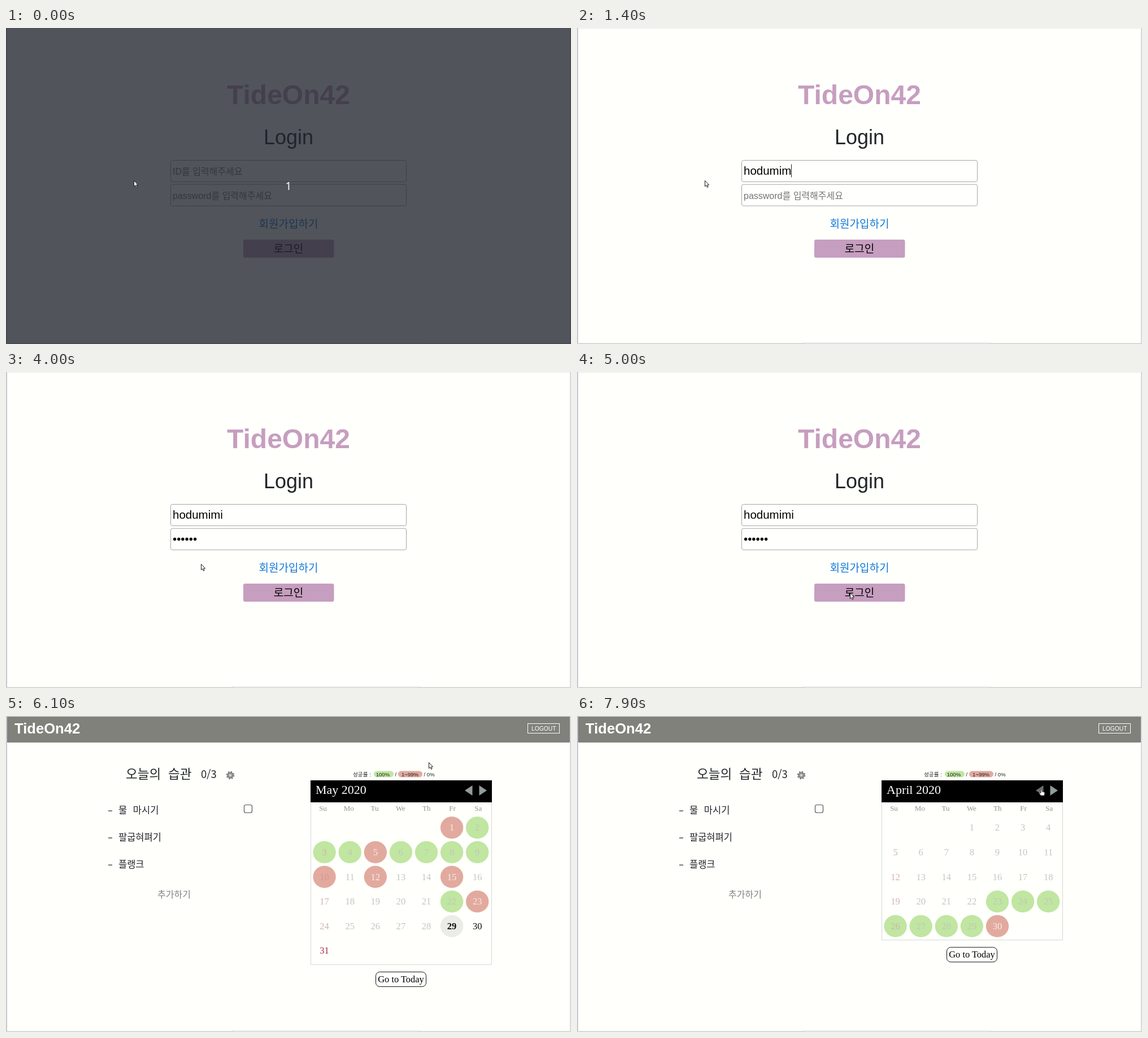
An HTML page for the animation above (8 s loop, 1000 by 560 pixels).

```html
<!DOCTYPE html>
<html lang="ko">
<head>
<meta charset="utf-8">
<title>Habit tracker</title>
<style>
html, body { margin: 0; width: 100%; height: 100%; overflow: hidden; background: #fffffc; }
svg { display: block; width: 1000px; height: 560px; }
text { white-space: pre; }
.sans { font-family: "Liberation Sans", "Noto Sans CJK KR", "Noto Sans CJK", sans-serif; }
.serif { font-family: "Liberation Serif", serif; }
.hand { font-family: "Noto Sans CJK KR", "Noto Sans CJK", sans-serif; font-weight: 300; }
.ui { font-family: "Noto Sans", sans-serif; }
</style>
</head>
<body>
<svg id="stage" viewBox="0 0 1000 560"></svg>
<script>
const LOOP = 8000, TICK = 100;
const BRAND = "TideOn42", USER = "hodumimi";
const INK = "#212529", GREEN = "#c0e6a1", RED = "#e2aa9e", LILAC = "#c69ebf", PAGE = "#fffffc";
const ID_KEYS = [400, 500, 700, 900, 1000, 1200, 1400, 1600];
const PW_KEYS = [2600, 2700, 2900, 3000, 3200, 3300];
// time, x, y of the pointer tip
const PATH = [
  [3800, 226, 270], [3900, 262, 292], [4000, 345, 340], [4100, 420, 370], [4200, 445, 377],
  [4400, 445, 377], [4500, 468, 385], [4600, 483, 391],
  [5600, 483, 391], [5700, 505, 362], [5800, 575, 255], [5900, 655, 140], [6000, 715, 66],
  [6100, 748, 82], [6200, 762, 105],
  [6400, 762, 105], [6500, 780, 113], [6600, 800, 122], [6700, 814, 127], [6800, 815, 113],
  [6900, 815, 113], [7000, 818, 127], [7100, 822, 130]
];

const stage = document.getElementById("stage");

function add(parent, tag, attrs, content) {
  const el = document.createElementNS("http://www.w3.org/2000/svg", tag);
  for (const key in attrs) el.setAttribute(key, attrs[key]);
  if (content !== undefined) el.textContent = content;
  parent.appendChild(el);
  return el;
}
const group = parent => add(parent, "g", {});
const rect = (parent, x, y, width, height, fill, more) =>
  add(parent, "rect", { x, y, width, height, fill, ...more });
const text = (parent, x, y, size, content, fill, cls = "sans", more) =>
  add(parent, "text", { x, y, "font-size": size, fill, class: cls, ...more }, content);
const mid = { "text-anchor": "middle" };
const show = (el, on) => el.setAttribute("display", on ? "inline" : "none");

rect(stage, 0, 0, 1000, 560, PAGE);

// Login page
const login = group(stage);
text(login, 500, 135, 48, BRAND, LILAC, "sans", { ...mid, "font-weight": 700 });
text(login, 500, 206, 36, "Login", INK, "sans", mid);

function field(y, hint) {
  rect(login, 291.5, y, 417, 38, "#fffffe", { rx: 3, stroke: "#a5a5a5" });
  return {
    hint: text(login, 295, y + 25.5, 16, hint, "#757575"),
    value: text(login, 295, y + 25.8, 20.5, "", "#000"),
    caret: rect(login, 295, y + 7, 1, 23, "#222")
  };
}
const idField = field(234.5, "ID를 입력해주세요");
const pwField = field(277.2, "password를 입력해주세요");
text(login, 500, 354, 19, "회원가입하기", "#0f78d9", "sans", mid);
rect(login, 420, 375, 160.5, 32, LILAC, { rx: 3 });
text(login, 500, 398, 19, "로그인", "#000", "sans", mid);

// Habit page
const home = group(stage);
rect(home, 2, 1, 996, 46, "#80817b");
text(home, 15, 31, 25.6, BRAND, "#fff", "sans", { "font-weight": 700 });
rect(home, 923.5, 13.5, 56, 17, "none", { stroke: "#fff" });
text(home, 951.7, 25.8, 10.3, "LOGOUT", "#fff", "sans", mid);

const heading = { style: "font-weight:400" };
text(home, 212, 111, 22.5, "오늘의", INK, "hand", heading);
text(home, 287, 111, 22.5, "습관", INK, "hand", heading);
text(home, 345, 110, 18.5, "0/3", INK, "hand", heading);

const gear = add(home, "g", { transform: "translate(397 105)", fill: "none" });
add(gear, "circle", { r: 6, stroke: "#777", "stroke-width": 2.6, "stroke-dasharray": `${Math.PI * 0.75}` });
add(gear, "circle", { r: 4.2, stroke: "#858585", "stroke-width": 3 });
add(gear, "circle", { r: 2, fill: "#f2f2ef", stroke: "#666", "stroke-width": 0.7 });

["물 마시기", "팔굽혀펴기", "플랭크"].forEach((habit, i) => {
  const y = 173 + i * 48;
  rect(home, 181, y - 5.5, 7, 1.2, INK);
  text(home, 199, y, 16.5, habit, INK, "hand", { "word-spacing": 6 });
});
rect(home, 421.5, 157.5, 14, 14, "#fff", { rx: 3, stroke: "#555", "stroke-width": 1.2 });
text(home, 268, 322, 16, "추가하기", "#808080");

text(home, 614, 107, 9.6, "성공률 :", INK);
rect(home, 651, 97.5, 35, 11, GREEN, { rx: 5.5 });
text(home, 654.7, 107, 9.6, "100%", INK);
text(home, 688.5, 107, 9.6, "/", INK);
rect(home, 694, 97.5, 43, 11, RED, { rx: 5.5 });
text(home, 700, 107, 9.6, "1~99%", INK);
text(home, 739.5, 107, 9.6, "/ 0%", INK);

function dayColor(day, sunday, mark, today) {
  if (day >= today) return sunday ? "#a52c45" : "#111";
  if (mark === RED) return sunday ? "#d3988f" : "#f5ebe9";
  if (mark === GREEN) return sunday ? "#d0b3a4" : "#bfc8b8";
  return sunday ? "#d3b3b8" : "#c5c6c5";
}

function month(title, first, days, green, red, today) {
  const root = group(home);
  const bottom = 178.7 + Math.ceil((first + days) / 7) * 43.65;
  rect(root, 539.5, 114.5, 320, bottom - 114.5, "none", { stroke: "#d3d9d4" });
  rect(root, 539, 114, 321, 39, "#000");
  text(root, 548, 138, 22, title, "#fff", "serif");
  ["Su", "Mo", "Tu", "We", "Th", "Fr", "Sa"].forEach((name, i) =>
    text(root, 561 + i * 45.8, 168, 13, name, "#8b9696", "serif", mid));
  const marks = group(root), plain = group(root), marked = group(root);
  for (let day = 1; day <= days; day++) {
    const slot = first + day - 1, col = slot % 7;
    const x = 563.6 + col * 45.1, y = 197.8 + Math.floor(slot / 7) * 43.65;
    const mark = green.includes(day) ? GREEN : red.includes(day) ? RED : "";
    const write = (layer, kind) => text(layer, x, y + 5.4, 16.6, day,
      dayColor(day, col === 0, kind, today), "serif",
      { ...mid, "font-weight": day === today ? 700 : 400 });
    if (mark || day === today) {
      add(day === today ? plain : marks, "ellipse",
        { cx: x, cy: y, rx: 20.2, ry: 19.6, fill: mark || "#ebebe8" });
    }
    write(plain, "");
    if (mark) {
      plain.lastChild.dataset.day = "marked";
      write(marked, mark);
    }
  }
  rect(root, 654.5, bottom + 13, 89, 26, "#fffffe", { rx: 7, stroke: "#111" });
  text(root, 699, bottom + 31.4, 16.4, "Go to Today", "#000", "serif", mid);
  const covered = plain.querySelectorAll("[data-day]");
  return {
    root,
    setMarks(on) {
      show(marks, on);
      show(marked, on);
      covered.forEach(el => show(el, !on));
    }
  };
}
const may = month("May 2020", 5, 31, [2, 3, 4, 6, 7, 8, 9, 22], [1, 5, 10, 12, 15, 23], 29);
const april = month("April 2020", 3, 30, [23, 24, 25, 26, 27, 28, 29], [30], 99);
const prev = add(home, "path", { d: "M812 132 L825.5 123 V141 Z" });
add(home, "path", { d: "M851 132 L837.5 123 V141 Z", fill: "#919c9b" });

const status = group(home);
rect(status, 1.5, 543.5, 331, 15, "#fafaf7", { stroke: "#dededb", rx: 1 });
text(status, 5, 554.5, 9.8, "Connecting…", "#777", "ui");

// Window edges
rect(stage, 0, 0, 2, 560, "#c8c7d0");
rect(stage, 998, 0, 2, 560, "#d9d9dc");
rect(stage, 2, 0, 996, 1, "#ebebe9");
rect(stage, 0, 558.3, 1000, 1.7, "#d4d4d3");
rect(stage, 400.5, 558.5, 331, 4, "#f6f6f3", { stroke: "#c4c4c3" });

const shade = group(stage);
rect(shade, 0, 0, 1000, 560, "#21252e", { opacity: 0.78 });
text(shade, 500, 287, 19, "1", "#fff", "ui", mid);

const pointer = group(stage);
const arrow = add(pointer, "path", {
  d: "M.5 .5 V10.8 L2.8 8.7 L4.4 12.4 L6.1 11.7 L4.5 8.1 H7.6 Z",
  fill: "#fff", stroke: "#1c1c1c", "stroke-width": 1
});
const hand = add(pointer, "path", {
  d: "M-1 1 Q0 -.8 1 1 V4 L5 5 Q6 5.3 5.8 7 L5 11 H-1 L-4 7 Q-4 5.3 -2.6 6 L-1 7 Z",
  fill: "#fff", stroke: "#1c1c1c", "stroke-width": 0.7
});

function tipAt(t) {
  let a = PATH[0];
  for (const b of PATH) {
    if (t < b[0]) {
      const k = Math.max(0, (t - a[0]) / (b[0] - a[0] || 1));
      return [a[1] + (b[1] - a[1]) * k, a[2] + (b[2] - a[2]) * k];
    }
    a = b;
  }
  return [a[1], a[2]];
}

const typed = (keys, t) => keys.filter(k => k <= t).length;

function setField(f, value, caretOn) {
  show(f.hint, !value);
  f.value.textContent = value;
  const width = value ? f.value.getComputedTextLength() : 0;
  f.caret.setAttribute("x", Math.round(295 + width));
  show(f.caret, caretOn);
}

function draw(time) {
  const t = Math.floor((time % LOOP) / TICK) * TICK;
  const within = (a, b) => t >= a && t < b;
  const onHome = t >= 5100;
  show(shade, t < 100);
  show(login, !onHome);
  show(home, onHome);

  if (!onHome) {
    setField(idField, USER.slice(0, typed(ID_KEYS, t)), within(400, 1700));
    setField(pwField, "•".repeat(typed(PW_KEYS, t)),
      within(1700, 2300) || within(2600, 3900) || within(4500, 4900));
  }

  const isApril = t >= 7800, hover = t >= 7000 || t === 6700;
  show(may.root, !isApril);
  show(april.root, isApril);
  may.setMarks(true);
  april.setMarks(t >= 7900);
  show(status, t < 5500);
  prev.setAttribute("fill", hover ? "#6a706f" : "#919c9b");

  const [x, y] = tipAt(t);
  pointer.setAttribute("transform", `translate(${x} ${y})`);
  show(arrow, !hover);
  show(hand, hover);
}

function loop() {
  draw(performance.now());
  requestAnimationFrame(loop);
}
loop();
</script>
</body>
</html>
```
